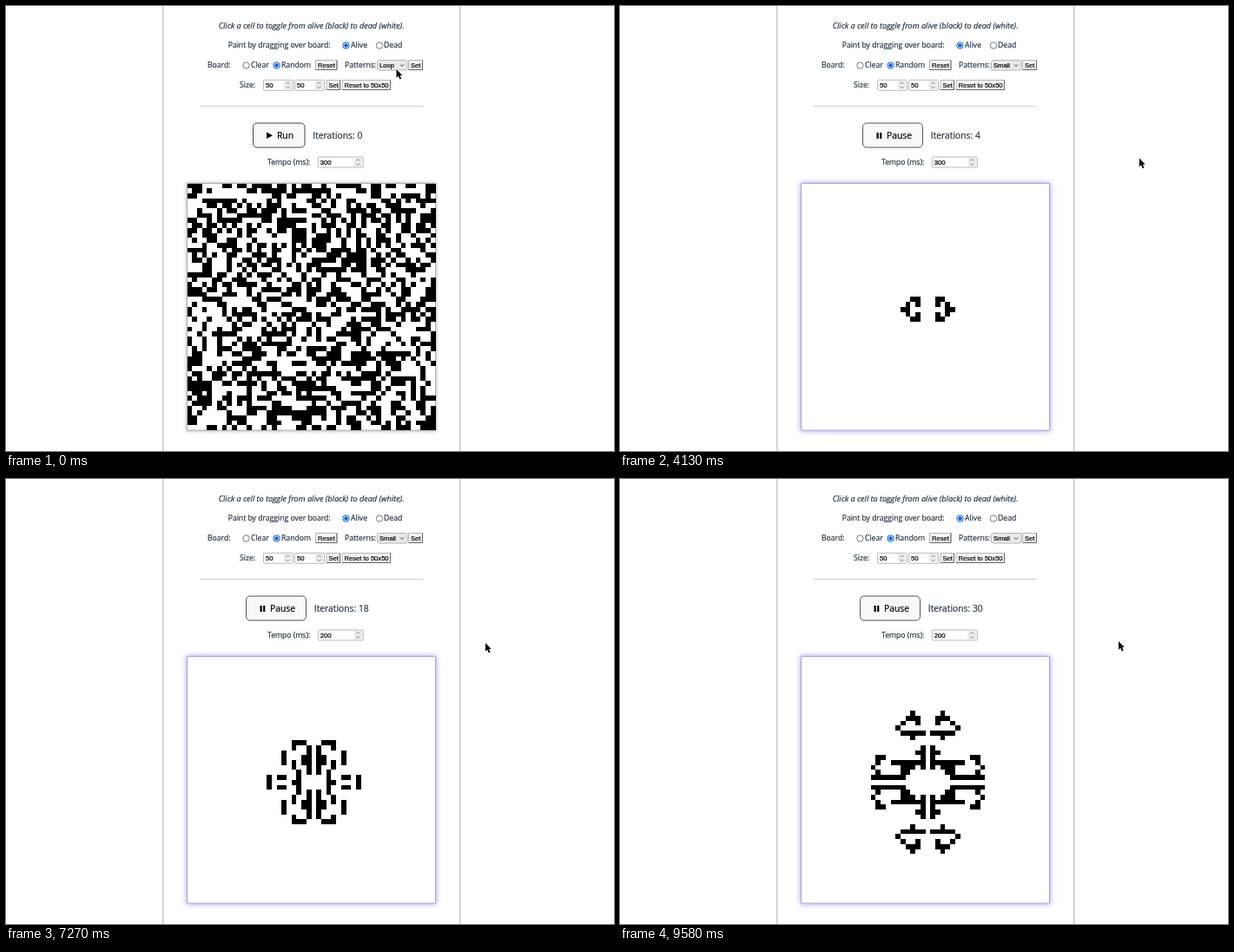
An HTML page with a canvas that plays this animation: 700 by 513 pixels, repeating every 9650 ms.

```html
<!DOCTYPE html>
<html lang="en">
<head>
<meta charset="utf-8">
<title>Game of Life</title>
<style>
  html, body { margin: 0; width: 100%; height: 100%; overflow: hidden; background: #fff; }
  canvas { display: block; }
</style>
</head>
<body>
<canvas id="stage" width="700" height="513"></canvas>
<script>
const ctx = document.getElementById('stage').getContext('2d');
const LOOP = 9650, N = 50;
const BOARD = { x: 208.6, y: 204.6, w: 286, h: 284.5 };
const UI = '"Open Sans", "Noto Sans", sans-serif';
const CONTROL = '"Liberation Sans", Arial, sans-serif';
const INK = '#213547', BLUE = '#0060df';
const OPTIONS = ['Loop', 'Small', 'Cross', 'Pulse', 'Line', 'Ship'];

// Moments of the interaction, in ms
const OPEN = 170, CHOOSE = 900, FOCUS_SET = 1400, PLACE = 1620, RUN = 2450, TEMPO = 5060;

// [time, generation]
const GENERATIONS = [[2790, 1], [3800, 4], [5160, 8], [5320, 9], [6550, 15], [6740, 16],
  [7930, 22], [8160, 23], [9350, 29], [9580, 30], [9800, 31]];
// [time, x, y]
const POINTER = [[0, 449.5, 73], [200, 449.5, 74], [700, 444, 100], [960, 444, 100], [1350, 483, 74],
  [1750, 483, 74], [2250, 325, 150], [2500, 325, 150], [2810, 502, 168], [2910, 581, 172],
  [3050, 594, 174], [3800, 594, 174], [4230, 599, 176], [4430, 595, 177], [4850, 406, 182],
  [5320, 406, 182], [6310, 555, 190], [6500, 601, 192], [6850, 600, 192], [7270, 552, 189],
  [7930, 545, 188], [8160, 555, 188], [8600, 575, 187], [9350, 574, 187], [9650, 574, 187]];

function track(keys, t) {
  if (t <= keys[0][0]) return keys[0].slice(1);
  const i = keys.findIndex(k => k[0] > t);
  if (i < 0) return keys[keys.length - 1].slice(1);
  const a = keys[i - 1], b = keys[i], p = (t - a[0]) / (b[0] - a[0]);
  return a.slice(1).map((v, j) => v + (b[j + 1] - v) * p);
}

function randomBoard() {
  let seed = 20231;
  return Array.from({ length: N * N }, () => {
    seed = (Math.imul(seed, 1664525) + 1013904223) >>> 0;
    return seed / 2 ** 32 < 0.47;
  });
}

function patternBoard(rows) {
  const cells = Array(N * N).fill(false);
  rows.forEach((row, r) => [...row].forEach((c, i) => { cells[(24 + r) * N + 22 + i] = c === '#'; }));
  return cells;
}

function nextBoard(cells) {
  return cells.map((alive, i) => {
    const x = i % N, y = Math.floor(i / N);
    let count = 0;
    for (let dy = -1; dy <= 1; dy++) for (let dx = -1; dx <= 1; dx++) {
      const cx = x + dx, cy = y + dy;
      if ((dx || dy) && cx >= 0 && cx < N && cy >= 0 && cy < N && cells[cy * N + cx]) count++;
    }
    return count === 3 || (alive && count === 2);
  });
}

const noise = randomBoard();
const history = [patternBoard(['###.###', '#.....#', '###.###'])];
while (history.length < 31) history.push(nextBoard(history[history.length - 1]));

// A hairline stroke gives the small type its weight
function text(str, x, y, size = 8.65, family = UI, color = INK, style = '') {
  ctx.font = `${style} ${size}px ${family}`;
  ctx.fillStyle = ctx.strokeStyle = color;
  ctx.lineWidth = 0.2;
  ctx.fillText(str, x, y);
  ctx.strokeText(str, x, y);
}

function box(x, y, w, h, r, fill, stroke, width = 1) {
  ctx.beginPath();
  ctx.roundRect(x, y, w, h, r);
  ctx.fillStyle = fill;
  ctx.fill();
  if (!stroke) return;
  ctx.strokeStyle = stroke;
  ctx.lineWidth = width;
  ctx.stroke();
}

function line(points, color, width = 1) {
  ctx.beginPath();
  points.forEach(([x, y]) => ctx.lineTo(x, y));
  ctx.strokeStyle = color;
  ctx.lineWidth = width;
  ctx.stroke();
}

function radio(x, y, checked) {
  ctx.beginPath();
  ctx.arc(x, y, 3.7, 0, 7);
  ctx.fillStyle = '#fff';
  ctx.fill();
  ctx.strokeStyle = checked ? BLUE : '#777781';
  ctx.lineWidth = 1;
  ctx.stroke();
  if (!checked) return;
  ctx.beginPath();
  ctx.arc(x, y, 2.3, 0, 7);
  ctx.fillStyle = BLUE;
  ctx.fill();
}

function button(label, x, y, w, focused) {
  box(x, y, w, 11, 0, '#f4f4f5', '#b5b5b8');
  line([[x + w, y], [x + w, y + 11], [x, y + 11]], '#666');
  if (focused) box(x, y, w, 11, 1, '#f4f4f5', '#2a2ac8', 1.2);
  text(label, x + 2.5, y + 8.5, 7.6, CONTROL, '#000');
}

function chevron(x, y, d, color = '#555') {
  line([[x - 2, y - d], [x, y + d], [x + 2, y - d]], color, 0.9);
}

function numberField(value, x, y, w) {
  box(x, y, w, 12, 1, '#fff', '#b9b9bf');
  ctx.fillStyle = '#ececf0';
  ctx.fillRect(x + w - 11, y + 1, 10, 10);
  chevron(x + w - 6, y + 3.5, -1, '#777');
  chevron(x + w - 6, y + 8.5, 1, '#777');
  text(value, x + 2.5, y + 8.8, 7.7, CONTROL, '#000');
}

function drawForm(t) {
  ctx.fillStyle = '#c9c9c9';
  ctx.fillRect(180, 0, 1.5, 513);
  ctx.fillRect(522, 0, 1.5, 513);
  ctx.fillStyle = '#d0d0d0';
  ctx.fillRect(223, 115, 257, 1);

  text('Click a cell to toggle from alive (black) to dead (white).', 244.7, 25.5, 9.1, UI, INK, 'italic');
  text('Paint by dragging over board:', 255.7, 48.3);
  radio(391.5, 45.5, true);
  text('Alive', 397, 48.3);
  radio(430, 45.5, false);
  text('Dead', 435, 48.3);

  text('Board:', 232, 71.3);
  radio(276.5, 68.5, false);
  text('Clear', 282, 71.3);
  radio(311.5, 68.5, true);
  text('Random', 317, 71.3);
  button('Reset', 356.5, 62.5, 24.5);
  text('Patterns:', 390, 71.3);
  box(427.5, 62.5, 34.5, 11.5, 2, '#e9e9ed', '#b5b5bb');
  text(t < CHOOSE ? 'Loop' : 'Small', 430, 71.2, 7.6, CONTROL, '#000');
  chevron(456, 68.5, 1, '#222');
  button('Set', 463.5, 62.5, 16, t >= FOCUS_SET && t < RUN);

  text('Size:', 269, 94.3);
  numberField('50', 296.5, 85.3, 34);
  numberField('50', 332.5, 85.3, 34);
  button('Set', 369, 85.5, 15.5);
  button('Reset to 50x50', 387, 85.5, 55.5);

  text('Tempo (ms):', 301, 183);
  numberField(t < TEMPO ? '300' : '200', 359.3, 174, 52);
}

function drawRunRow(running, gen) {
  const x = !running ? 284.5 : gen < 10 ? 279.5 : 276.5;
  const w = running ? 69 : 59.5;
  box(x, 135, w, 28, 4.5, '#f9f9f9', running ? '#555' : '#444');
  ctx.fillStyle = '#000';
  if (running) {
    ctx.fillRect(x + 16, 146, 2.2, 7);
    ctx.fillRect(x + 19.6, 146, 2.2, 7);
  } else {
    ctx.beginPath();
    ctx.moveTo(300, 145.5);
    ctx.lineTo(307, 149.3);
    ctx.lineTo(300, 153.1);
    ctx.fill();
  }
  text(running ? 'Pause' : 'Run', x + 27.5, 153.3, 10.3, UI, '#000');
  text(`Iterations: ${gen}`, x + w + 9.3, 153.3, 10.3);
}

function drawBoard(cells, running) {
  const { x, y, w, h } = BOARD;
  ctx.save();
  ctx.shadowBlur = running ? 6 : 4;
  ctx.shadowColor = running ? 'rgba(100, 80, 255, 0.6)' : '#aaa';
  box(x - 0.4, y - 0.4, w + 0.8, h + 0.8, 0, '#fff');
  ctx.restore();
  box(x, y, w, h, 0, '#fff', running ? '#a3a0d4' : '#aaa');
  ctx.fillStyle = '#000';
  const px = c => Math.round(x + c * w / N), py = r => Math.round(y + r * h / N);
  cells.forEach((alive, i) => {
    if (!alive) return;
    const c = i % N, r = Math.floor(i / N);
    ctx.fillRect(px(c), py(r), px(c + 1) - px(c), py(r + 1) - py(r));
  });
}

function drawOptions(pointerY) {
  const row = 17.5, top = 76;
  box(428, top, 34.5, 106.5, 1, '#fff', '#bbb');
  OPTIONS.forEach((name, i) => {
    const y = top + 1 + i * row;
    if (pointerY >= y && pointerY < y + row) {
      ctx.fillStyle = '#d8d8dc';
      ctx.fillRect(428.5, y, 33.5, row);
    }
    text(name, 431, y + 11.5, 7.6, CONTROL, '#000');
  });
}

const ARROW = new Path2D('M0 0V9.8L2.2 7.8L3.9 11.6L5.6 10.8L4 7.1H6.8Z');
const HAND = new Path2D('M-1 1Q0 -.6 1 1V4.5Q2 3.6 2.8 4.8Q3.8 4.2 4.4 5.2Q5.8 4.8 5.9 6.3' +
  'Q6 9 4.8 11.5H-.2Q-1 9.5 -3 7.2Q-2.8 5.6 -1 7Z');

function drawPointer(x, y, hand) {
  ctx.save();
  ctx.translate(x, y);
  ctx.lineWidth = hand ? 1.4 : 0.9;
  ctx.fillStyle = hand ? '#fff' : '#000';
  ctx.strokeStyle = hand ? '#000' : '#fff';
  ctx.stroke(hand ? HAND : ARROW);
  ctx.fill(hand ? HAND : ARROW);
  ctx.restore();
}

function draw(now) {
  const t = now % LOOP;
  const running = t >= RUN;
  const gen = t < GENERATIONS[0][0] ? 0 : Math.min(30, Math.floor(track(GENERATIONS, t)[0] + 1e-6));
  const [x, y] = track(POINTER, t);
  const overButton = (t > 1250 && t < 1800) || (t > 2180 && t < 2570);

  ctx.fillStyle = '#fff';
  ctx.fillRect(0, 0, 700, 513);
  drawForm(t);
  drawRunRow(running, gen);
  drawBoard(t < PLACE ? noise : history[gen], running);
  if (t >= OPEN && t < CHOOSE) drawOptions(y);
  drawPointer(x, y, overButton);
  requestAnimationFrame(draw);
}
requestAnimationFrame(draw);
</script>
</body>
</html>
```
